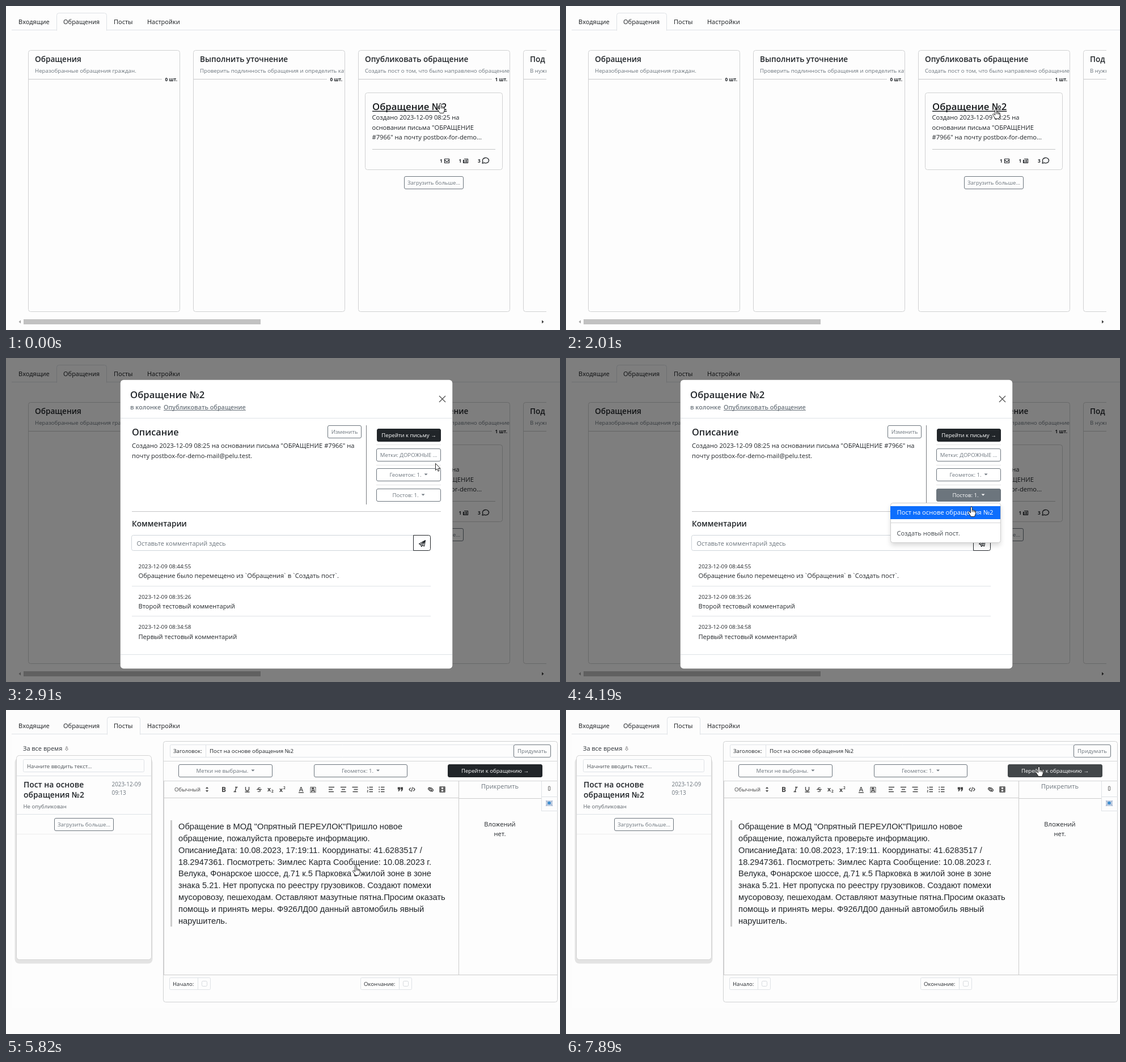
An HTML page with a canvas for the animation above (8000 ms loop, 977 by 573 pixels).

```html
<!DOCTYPE html>
<html lang="ru">
<head>
<meta charset="utf-8">
<title>Обращения</title>
<style>
html, body { margin: 0; width: 100%; height: 100%; overflow: hidden; background: #fdfdfd; }
canvas { display: block; width: 977px; height: 573px; }
</style>
</head>
<body>
<canvas id="stage" width="977" height="573"></canvas>
<script>
const c = document.getElementById('stage').getContext('2d');
const LOOP = 8000;
const UI = '"Open Sans", "Noto Sans", sans-serif';
const SANS = '"Liberation Sans", Arial, sans-serif';
const PAGE = '#fdfdfd', INK = '#212529', GRAY = '#6c757d', EDGE = '#d0d1d2', PALE = '#dee2e6';

// Pointer stops: time, x, y, shape (a = arrow, h = hand, i = text)
const boardStops = [
  [0, 766, 172, 'h'], [370, 802, 208, 'i'], [520, 803, 222, 'i'], [640, 804, 238, 'i'],
  [760, 806, 255, 'a'], [880, 806, 266, 'a'], [1000, 806, 276, 'a'], [1530, 803, 268, 'a'],
  [1650, 797, 249, 'a'], [1770, 785, 222, 'i'], [1890, 769, 198, 'i'], [2010, 758, 182, 'h'],
  [2130, 757, 182, 'a']
];
const modalStops = [
  [2280, 757, 182, 'h'], [2910, 757, 186, 'a'], [3030, 754, 200, 'h'], [3150, 750, 214, 'h'],
  [3300, 747, 222, 'a'], [3420, 745, 233, 'h'], [3540, 745, 239, 'h'], [4070, 738, 247, 'h'],
  [4190, 715, 263, 'h'], [4310, 676, 269, 'h'], [4430, 628, 272, 'h'], [4550, 581, 272, 'h'],
  [4670, 597, 272, 'h'], [4820, 648, 273, 'h'], [4940, 706, 274, 'h'], [5060, 738, 275, 'h'],
  [5180, 713, 275, 'h'], [5300, 667, 275, 'h'], [5440, 617, 275, 'h']
];
const postStops = [
  [5820, 617, 275, 'h'], [5940, 620, 280, 'a'], [6060, 622, 283, 'i'], [6900, 594, 272, 'i'],
  [7050, 555, 246, 'i'], [7170, 450, 192, 'i'], [7290, 345, 141, 'h'], [7410, 430, 115, 'h'],
  [7530, 610, 108, 'h'], [7650, 735, 104, 'a'], [7770, 818, 101, 'h'], [7890, 834, 100, 'h']
];

let pointer = boardStops[0];

function stopAt(stops, t) {
  let found = stops[0];
  for (const s of stops) if (s[0] <= t) found = s;
  return found;
}

function over(x, y, w, h) {
  const [, px, py] = pointer;
  return px >= x && px <= x + w && py >= y && py <= y + h;
}

function text(s, x, y, size = 11.15, color = INK, weight = 400, align = 'left', family = UI) {
  c.font = `${weight} ${size}px ${family}`;
  c.fillStyle = color;
  c.textAlign = align;
  c.fillText(s, x, y);
  return c.measureText(s).width;
}

function box(x, y, w, h, r, stroke, fill) {
  c.beginPath();
  c.roundRect(x + .5, y + .5, w, h, r);
  if (fill) { c.fillStyle = fill; c.fill(); }
  if (stroke) { c.strokeStyle = stroke; c.lineWidth = 1; c.stroke(); }
}

function rect(x, y, w, h, color) {
  c.fillStyle = color;
  c.fillRect(x, y, w, h);
}

const hline = (x1, x2, y, color = PALE) => rect(x1, y, x2 - x1, 1, color);
const vline = (x, y1, y2, color = PALE) => rect(x, y1, 1, y2 - y1, color);

function dot(x, y, r, color) {
  c.fillStyle = color;
  c.beginPath();
  c.arc(x, y, r, 0, 7);
  c.fill();
}

function icon(d, x, y, stroke, width = 1.2, fill) {
  const p = new Path2D(d);
  c.save();
  c.translate(x, y);
  c.lineJoin = 'round';
  if (fill) { c.fillStyle = fill; c.fill(p); }
  if (stroke) { c.strokeStyle = stroke; c.lineWidth = width; c.stroke(p); }
  c.restore();
}

function clip(x, y, w, h, draw) {
  c.save();
  c.beginPath();
  c.rect(x, y, w, h);
  c.clip();
  draw();
  c.restore();
}

function button(x, y, w, h, label, { caret, dark, hot, still } = {}) {
  const lit = hot || (!still && over(x, y, w, h));
  const fill = dark ? (lit ? '#424649' : INK) : lit ? GRAY : null;
  const color = fill ? '#fff' : GRAY;
  box(x, y, w, h, 2.5, dark ? fill : GRAY, fill);
  c.font = `${fill ? 500 : 400} 9.6px ${UI}`;
  const tw = c.measureText(label).width;
  const left = x + .5 + (w - tw - (caret ? 11 : 0)) / 2;
  const mid = y + h / 2;
  text(label, left, mid + 4, 9.6, color, fill ? 500 : 400);
  if (caret) icon('M0 0H6L3 3z', left + tw + 5, mid - 1.5, null, 0, color);
}

function tabs(x, w) {
  hline(10, 977, 42);
  box(x, 12, w, 31, [4, 4, 0, 0], PALE, PAGE);
  rect(x + 1, 42, w - 1, 3, PAGE);
  const labels = [['Входящие', 22], ['Обращения', 101], ['Посты', 190], ['Настройки', 249]];
  for (const [s, left] of labels) text(s, left, 32, 11, '#16191c');
}

function column(x, title, note, count) {
  box(x, 78, 267, 462, 4, EDGE);
  clip(x, 78, 267, 70, () => {
    text(title, x + 12, 99, 13.6, INK, 600);
    text(note, x + 12, 118, 9.7, GRAY);
  });
  hline(x + 1, x + 236, 129, '#c8c9ca');
  text(count, x + 263, 133, 8.3, INK, 700, 'right');
}

function card() {
  box(633, 153, 242, 136, 4, EDGE);
  const color = over(646, 170, 134, 18) ? '#16191c' : INK;
  const w = text('Обращение №2', 646, 184, 16.7, color, 600);
  rect(646, 185.5, w, 1.4, color);
  ['Создано 2023-12-09 08:25 на', 'основании письма "ОБРАЩЕНИЕ', '#7966" на почту postbox-for-demo...']
    .forEach((s, i) => text(s, 645.5, 201 + i * 17.7));
  hline(646, 863, 253, '#c4c5c6');
  text('1', 765, 277, 8.3, INK, 700);
  icon('M-4 -3.5H4V3.5H-4zM-4 -1.5L0 1.5L4 -1.5', 777.5, 274, INK, 1.2);
  text('1', 798.5, 277, 8.3, INK, 700);
  icon('M-2.5 -3.5H4V3.5H-4V-1.5H-2.5V3M-.5 -1.5H2.5M-.5 .2H2.5M-.5 1.9H2.5', 810.5, 274, INK, 1.2);
  text('3', 832, 277, 8.3, INK, 700);
  icon('M-5.5 5L-4.6 2.2A5.6 4.7 0 1 1 -2.4 4.2Q-3.8 5 -5.5 5z', 845.5, 273, INK, 1.3);
}

function board() {
  rect(0, 0, 977, 573, PAGE);
  tabs(89, 88);
  column(39, 'Обращения', 'Неразобранные обращения граждан.', '0 шт.');
  column(330, 'Выполнить уточнение', 'Проверить подлинность обращения и определить категорию', '0 шт.');
  column(621, 'Опубликовать обращение', 'Создать пост о том, что было направлено обращение', '1 шт.');
  clip(900, 70, 53, 480, () => column(912, 'Под', 'В нужный', ''));
  card();
  button(702, 301, 104, 22, 'Загрузить больше...', { still: true });
  rect(31, 554, 418, 9, '#c1c1c1');
  icon('M2 -3V3L-1.5 0z', 24, 558.5, null, 0, '#a3a3a3');
  icon('M-2 -3V3L1.5 0z', 947, 558.5, null, 0, '#404040');
}

function shade() {
  rect(0, 0, 977, 573, 'rgba(0,0,0,.5)');
}

function loader() {
  dot(745, 309, 1.4, '#333');
  dot(754, 309, 3, '#0c0c0c');
  dot(763, 309, 1.4, '#333');
}

// Backticks are set in the narrower face
function comment(y, date, body) {
  text(date, 233.5, y, 9.85);
  let x = 233.5;
  for (const part of body.split(/(`)/)) {
    x += text(part, x, y + 17.5, 11.15, INK, 400, 'left', part === '`' ? SANS : UI);
  }
}

function modal(menu) {
  box(201, 38, 586, 511, 6, 'rgba(0,0,0,.18)', '#fff');
  text('Обращение №2', 219, 71, 16.7, INK, 600);
  text('в колонке', 219, 91, 10.8, GRAY, 600);
  const w = text('Опубликовать обращение', 278, 91, 10.8, GRAY, 600);
  rect(278, 92, w, 1, GRAY);
  icon('M-5.5 -5.5L5.5 5.5M5.5 -5.5L-5.5 5.5', 769.5, 72.5, '#555', 1.4);
  hline(202, 787, 106);

  text('Описание', 222, 137, 16.3, INK, 600);
  button(567, 119, 59, 22, 'Изменить');
  text('Создано 2023-12-09 08:25 на основании письма "ОБРАЩЕНИЕ #7966" на', 222, 159);
  text('почту postbox-for-demo-mail@pelu.test.', 222, 177);
  vline(635, 119, 259, '#777b7f');
  button(654, 125, 112, 22, 'Перейти к письму →', { dark: true });
  for (const y of [153, 189, 224]) hline(653, 767, y, '#e2e3e4');
  button(653, 160, 113, 22, 'Метки: ДОРОЖНЫЕ ...');
  button(653, 195, 113, 22, 'Геометок: 1.', { caret: true });
  button(653, 231, 113, 22, 'Постов: 1.', { caret: true, hot: menu });
  hline(222, 767, 271, '#c4c5c6');

  text('Комментарии', 222, 298, 13.6, INK, 600);
  box(221, 313, 497, 27, [3, 0, 0, 3], '#ced4da');
  text('Оставьте комментарий здесь', 230.5, 332, 11, GRAY);
  box(718, 313, 30, 27, [0, 3, 3, 0], INK);
  icon('M5.5 -5.5L-5.5 .8L-2.5 2.2L-1.5 5.5L.3 3.4L3.6 4.8zM5.5 -5.5L-2.5 2.2M5.5 -5.5L.3 3.4', 734, 328, INK, 1.2);
  comment(371.5, '2023-12-09 08:44:55', 'Обращение было перемещено из `Обращения` в `Создать пост`.');
  hline(222, 749, 403);
  comment(425.5, '2023-12-09 08:35:26', 'Второй тестовый комментарий');
  hline(222, 749, 456);
  comment(479, '2023-12-09 08:34:58', 'Первый тестовый комментарий');
  hline(202, 787, 524);

  if (menu) dropdown();
}

function dropdown() {
  c.save();
  c.shadowColor = 'rgba(0,0,0,.15)';
  c.shadowBlur = 9;
  c.shadowOffsetY = 5;
  box(572, 256, 194, 70, 4, null, '#fff');
  c.restore();
  box(572, 256, 194, 70, 4, '#cdcdcd');
  rect(572, 262, 194, 23, '#0d6efd');
  text('Пост на основе обращения №2', 583.5, 277, 11.2, '#fff', 500);
  hline(573, 766, 291, '#d3d4d5');
  text('Создать новый пост.', 583.5, 314, 11.1, '#40464b');
}

function toolbar() {
  const k = '#444', y = 140;
  const ink = over(297, 130, 62, 20) ? '#06c' : k;
  text('Обычный', 297, 144, 9.6, ink);
  icon('M-2.6 -1.4H2.6L0 -4.4zM-2.6 1.4H2.6L0 4.4z', 354.5, y + .5, null, 0, ink);
  text('B', 384, y + 4.5, 12, k, 700, 'center');
  icon('M-1 -4H3.5M-3.5 4H1M1.3 -4L-1.3 4', 405, y + .5, k, 1.4);
  icon('M-3 -4.5V-.5a3 3 0 0 0 6 0V-4.5M-4 4.5H4', 425.5, y + .5, k, 1.4);
  text('S', 446.5, y + 4.5, 11.5, k, 600, 'center');
  icon('M-4.5 0H4.5', 446.5, y + .5, k, 1.2);
  text('x', 461, y + 4, 10.5, k, 700);
  text('2', 468, y + 6, 6.5, k, 700);
  text('x', 482, y + 4.5, 10.5, k, 700);
  text('2', 489, y, 6.5, k, 700);
  text('A', 520.5, y + 4, 11, k, 600, 'center');
  icon('M-4.5 5.5H4.5', 520.5, y + .5, k, 1.4);
  c.save();
  c.setLineDash([1.2, 1.2]);
  icon('M-4.5 -4.5H4.5V4.5H-4.5zM-2.5 -2.5H2.5', 541.5, y + 1, k, 1.8);
  c.restore();
  text('A', 541.5, y + 5, 10, k, 700, 'center');
  icon('M-5 -4H5M-5 0H2M-5 4H4', 574, y + .5, k, 1.4);
  icon('M-5 -4H5M-3 0H3M-4.5 4H4.5', 595, y + .5, k, 1.4);
  icon('M-5 -4H5M-2 0H5M-4 4H5', 615.5, y + .5, k, 1.4);
  for (const x of [642, 662.5]) icon('M-1.5 -4H5M-1.5 0H5M-1.5 4H5', x, y + .5, k, 1.4);
  icon('M-5 -4.4H-4V-1.6M-5.2 1.6H-3.6L-5 4.6H-3.4', 642, y + .5, k, 1);
  for (const d of [-4, 0, 4]) dot(658.2, y + .5 + d, 1, k);
  for (const x of [693, 698]) icon('M-2.2 -3.5H2V.4L.2 3.8H-1.6L-.4 .5H-2.2z', x, y, null, 0, k);
  icon('M-2.4 -3L-5 0L-2.4 3M2.4 -3L5 0L2.4 3M.9 -4L-.9 4', 716, y + .5, k, 1.3);
  icon('M-.8 .8A2.2 2.2 0 0 1 -.8 -2L-2 -3.3A2.2 2.2 0 0 0 -4.3 -.6L-1 2.6A2.2 2.2 0 0 0 2 1' +
       'M.8 -.8A2.2 2.2 0 0 1 .8 2L2 3.3A2.2 2.2 0 0 0 4.3 .6L1 -2.6A2.2 2.2 0 0 0 -2 -1', 749, y + .5, k, 1.4);
  icon('M-4.5 -4.5H4.5V4.5H-4.5zM-2.4 -4.5V4.5M2.4 -4.5V4.5M-2.4 0H2.4M-4.5 -1.5H-2.4M-4.5 1.5H-2.4M2.4 -1.5H4.5M2.4 1.5H4.5', 769.5, y + .5, k, 1.4);
}

function postList() {
  text('За все время', 30, 72, 11, '#30353a');
  icon('M-1 -3.5V.5H-2.6L0 3.5L2.6 .5H1V-3.5z', 107, 68.5, '#777', .8);
  box(15, 84, 243, 364, 8, null, '#e3e3e3');
  box(18, 80, 238, 361, 5, '#d3d3d3', PAGE);
  box(30, 87, 213, 22, 2, PALE);
  text('Начните вводить текст...', 37, 103, 9.6, '#4a5056');
  hline(19, 256, 116);
  text('Пост на основе', 31, 137, 13.9, INK, 600);
  text('обращения №2', 31, 155, 13.9, INK, 600);
  text('2023-12-09', 186.5, 134.5, 9.9, GRAY);
  text('09:13', 186.5, 150, 9.9, GRAY);
  text('Не опубликован', 30.5, 174, 9.6, '#5c636a');
  hline(19, 256, 184);
  button(85, 191, 104, 22, 'Загрузить больше...');
  hline(19, 256, 219, '#ececec');
}

function tickField(x, w, label, split) {
  box(x, 473, w, 21, 2, PALE);
  text(label, x + 6, 488, 9.6);
  vline(split, 474, 494);
  box(split + 7, 479, 9, 9, 2, '#d5d9dd', '#fff');
}

function post() {
  rect(0, 0, 977, 573, '#fcfcfc');
  rect(10, 43, 967, 484, PAGE);
  tabs(178, 58);
  postList();

  box(277, 55, 695, 461, 4, EDGE);
  box(289, 61, 606, 22, [2, 0, 0, 2], PALE);
  text('Заголовок:', 295, 76, 9.6);
  vline(352, 62, 83);
  text('Пост на основе обращения №2', 359, 76, 9.75);
  button(895, 61, 65, 22, 'Придумать');
  hline(278, 973, 90, '#d5d6d7');
  button(304, 96, 165, 22, 'Метки не выбраны.', { caret: true });
  button(543, 96, 164, 22, 'Геометок: 1.', { caret: true });
  button(779, 96, 166, 22, 'Перейти к обращению →', { dark: true });

  hline(278, 973, 125, '#d5d6d7');
  hline(278, 799, 155, '#ccc');
  hline(278, 973, 468, '#ccc');
  vline(278, 125, 469, '#ccc');
  vline(798, 125, 469, '#ccc');
  toolbar();

  rect(290, 195, 3, 188, '#ccc');
  [
    'Обращение в МОД "Опрятный ПЕРЕУЛОК"Пришло новое',
    'обращение, пожалуйста проверьте информацию.',
    'ОписаниеДата: 10.08.2023, 17:19:11. Координаты: 41.6283517 /',
    '18.2947361. Посмотреть: Зимлес Карта Сообщение: 10.08.2023 г.',
    'Велука, Фонарское шоссе, д.71 к.5 Парковка в жилой зоне в зоне',
    'знака 5.21. Нет пропуска по реестру грузовиков. Создают помехи',
    'мусоровозу, пешеходам. Оставляют мазутные пятна.Просим оказать',
    'помощь и принять меры. Ф926ЛД00 данный автомобиль явный',
    'нарушитель.'
  ].forEach((s, i) => text(s, 304, 211 + i * 20.87, 14.66, INK, 400, 'left', SANS));

  text('Прикрепить', 871, 139, 11, GRAY, 400, 'center');
  hline(799, 944, 156, '#ccc');
  text('Вложений', 871, 206, 11.1, INK, 400, 'center');
  text('нет.', 871, 223, 11.1, INK, 400, 'center');
  vline(944, 126, 178);
  hline(944, 973, 153);
  hline(944, 973, 178);
  icon('M-1.5 0V-2.5A1.6 1.6 0 0 1 1.5 -2.5V1M1.5 0V3A1.6 1.6 0 0 1 -1.5 3V-.5', 958, 138.5, '#777', 1.1);
  rect(952, 160, 12, 10, '#c3cfe2');
  icon('M-6 -5L0 1L6 -5M-6 5L-2 0M6 5L2 0', 958, 165, '#8fa6c8', .8);
  dot(958, 164.5, 2.8, '#3f8fd0');

  tickField(288, 72, 'Начало:', 338);
  tickField(625, 90, 'Окончание:', 693);
}

function drawPointer() {
  const [, x, y, shape] = pointer;
  if (shape === 'a') {
    icon('M.5 .5V12.6L3.2 10L5 14.3L7 13.4L5.2 9.3H9z', x, y, '#111', .9, '#fff');
  } else if (shape === 'h') {
    icon('M-1.4 11V1.6a1.4 1.4 0 0 1 2.8 0V6.4a1.3 1.3 0 0 1 2.4 .4a1.2 1.2 0 0 1 2 .5a1 1 0 0 1 1.5 .9' +
         'V12.5L5.6 17.4H-.8L-5.2 10.6Q-5.8 9.2 -4.6 8.8Q-3.4 8.6 -1.4 11zM1.4 6.4V9.4M3.8 6.8V9.6M5.8 7.3V9.8',
         x, y, '#111', .9, '#fff');
  } else {
    icon('M-3 -6.5H-1L0 -5.5L1 -6.5H3M0 -5.5V5.5M-3 6.5H-1L0 5.5L1 6.5H3', x, y, '#222', 1);
  }
}

function draw(t) {
  if (t < 2280) {
    pointer = stopAt(boardStops, t);
    board();
    if (t >= 2130) {
      shade();
      loader();
    }
  } else if (t < 5820) {
    pointer = stopAt(modalStops, t);
    board();
    shade();
    modal(t >= 3790);
  } else {
    pointer = stopAt(postStops, t);
    post();
  }
  drawPointer();
}

let start;
function tick(now) {
  start ??= now;
  draw((now - start) % LOOP);
  requestAnimationFrame(tick);
}
requestAnimationFrame(tick);
</script>
</body>
</html>
```
